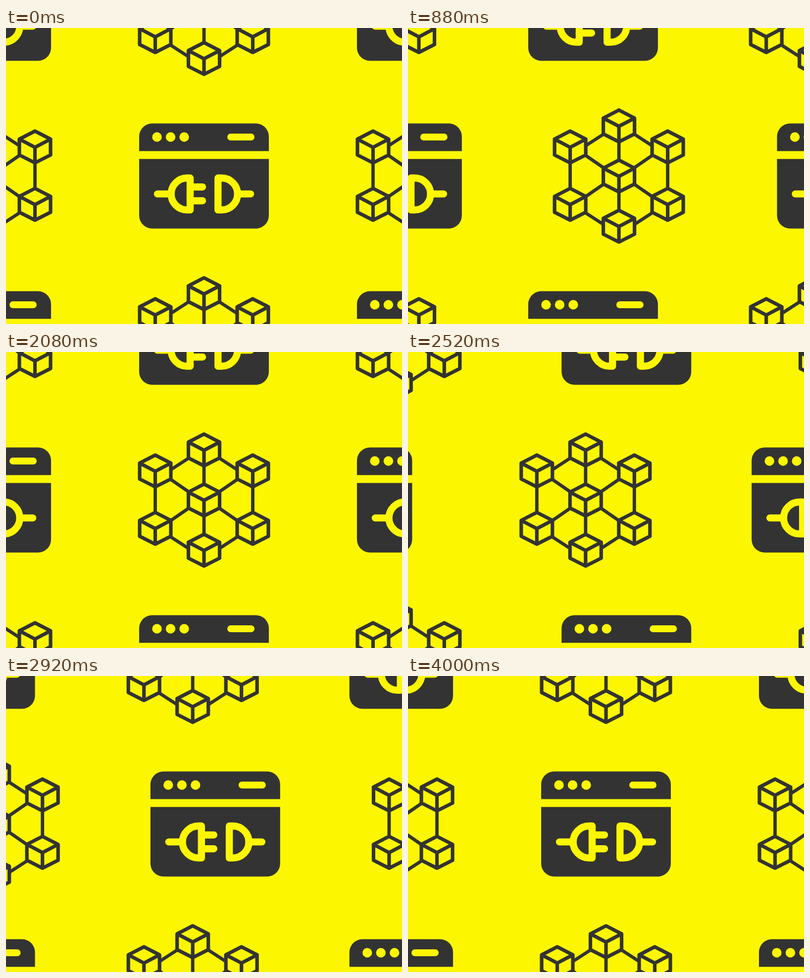
These frames come from a looping animation (800 px wide and 600 px high, 4040 ms). An HTML page:

```html
<!DOCTYPE html>
<html lang="en">
<head>
<meta charset="utf-8">
<title>Sliding icon pattern</title>
<style>
  html, body { margin: 0; width: 100%; height: 100%; overflow: hidden; background: #fcf700; }
  svg { display: block; width: 100%; height: 100%; }
</style>
</head>
<body>
<svg id="stage" viewBox="0 0 800 600">
  <defs>
    <g id="window" fill="#333">
      <path d="M-131-50.5V-80A26.5 26.5 0 0 1-104.5-106.5H104.5A26.5 26.5 0 0 1 131-80V-50.5Z"/>
      <path d="M-131-34.5H131V80A26.5 26.5 0 0 1 104.5 106.5H-104.5A26.5 26.5 0 0 1-131 80Z"/>
      <g fill="#fcf700">
        <circle cx="-95" cy="-79" r="9.7"/>
        <circle cx="-67.5" cy="-79" r="9.7"/>
        <circle cx="-40" cy="-79" r="9.7"/>
        <rect x="47" y="-86" width="55" height="14" rx="7"/>
      </g>
      <g fill="none" stroke="#fcf700" stroke-width="14.4" stroke-linecap="round" stroke-linejoin="round">
        <path d="M-28 4H-34A32.4 32.4 0 0 0-34 68.8H-28Z"/>
        <path d="M-94 36.4H-67M-28 22.2H-3M-28 50.2H-3"/>
        <path d="M28.3 4H35.4A32.4 32.4 0 0 1 35.4 68.8H28.3Z"/>
        <path d="M68 36.4H94"/>
      </g>
    </g>
    <path id="cube" stroke-width="7.2" d="M0-32.2L31.5-15.9V16.2L0 32.2L-31.5 16.2V-15.9ZM-31.5-15.9L0 .7L31.5-15.9M0 .7V32.2"/>
    <path id="links" d="M-31.5-84.5L-66.9-61.5M-66.9-41.5L-31.5-17M-31.5 17L-66.9 41.5M-66.9 75L-31.5 98M-98.5-26V26"/>
    <g id="network" fill="none" stroke="#333" stroke-width="6.8" stroke-linejoin="round">
      <use href="#links"/>
      <use href="#links" transform="scale(-1 1)"/>
      <path d="M0-69V-32M0 32V69"/>
      <use href="#cube" y="0"/>
      <use href="#cube" y="-101.4"/>
      <use href="#cube" y="101.7"/>
      <use href="#cube" x="-98.5" y="-58.8"/>
      <use href="#cube" x="98.5" y="-58.8"/>
      <use href="#cube" x="-98.5" y="57.3"/>
      <use href="#cube" x="98.5" y="57.3"/>
    </g>
  </defs>
</svg>
<script>
  const LOOP = 4040, PITCH_X = 440, PITCH_Y = 340;
  const DURATION = 630, STAGGER = 30, STARTS = [411, 2440];
  const stage = document.getElementById('stage');
  const items = [];

  // Outer rows mirror the middle row and swap the two icons.
  for (let row = -1; row <= 1; row++) {
    for (let slot = -2; slot <= 4; slot++) {
      const node = document.createElementNS('http://www.w3.org/2000/svg', 'use');
      node.setAttribute('href', (row + slot) % 2 === 0 ? '#window' : '#network');
      stage.appendChild(node);
      items.push({ node, slot, y: 300 + row * PITCH_Y, side: row === 0 ? 1 : -1 });
    }
  }

  // cubic-bezier(.28, 0, .2, 1)
  function ease(u) {
    if (u <= 0) return 0;
    if (u >= 1) return 1;
    let low = 0, high = 1;
    for (let i = 0; i < 24; i++) {
      const s = (low + high) / 2, r = 1 - s;
      if (0.84 * s * r * r + 0.6 * s * s * r + s * s * s < u) low = s;
      else high = s;
    }
    return low * low * (3 - 2 * low);
  }

  function draw(now) {
    const time = now % LOOP;
    for (const { node, slot, y, side } of items) {
      let place = slot;
      STARTS.forEach((start, step) => {
        place -= ease((time - start - STAGGER * (slot - step)) / DURATION);
      });
      node.setAttribute('transform', `translate(${400 + side * PITCH_X * place} ${y})`);
    }
  }

  const origin = performance.now();
  function tick() {
    draw(performance.now() - origin);
    requestAnimationFrame(tick);
  }
  tick();
</script>
</body>
</html>
```
